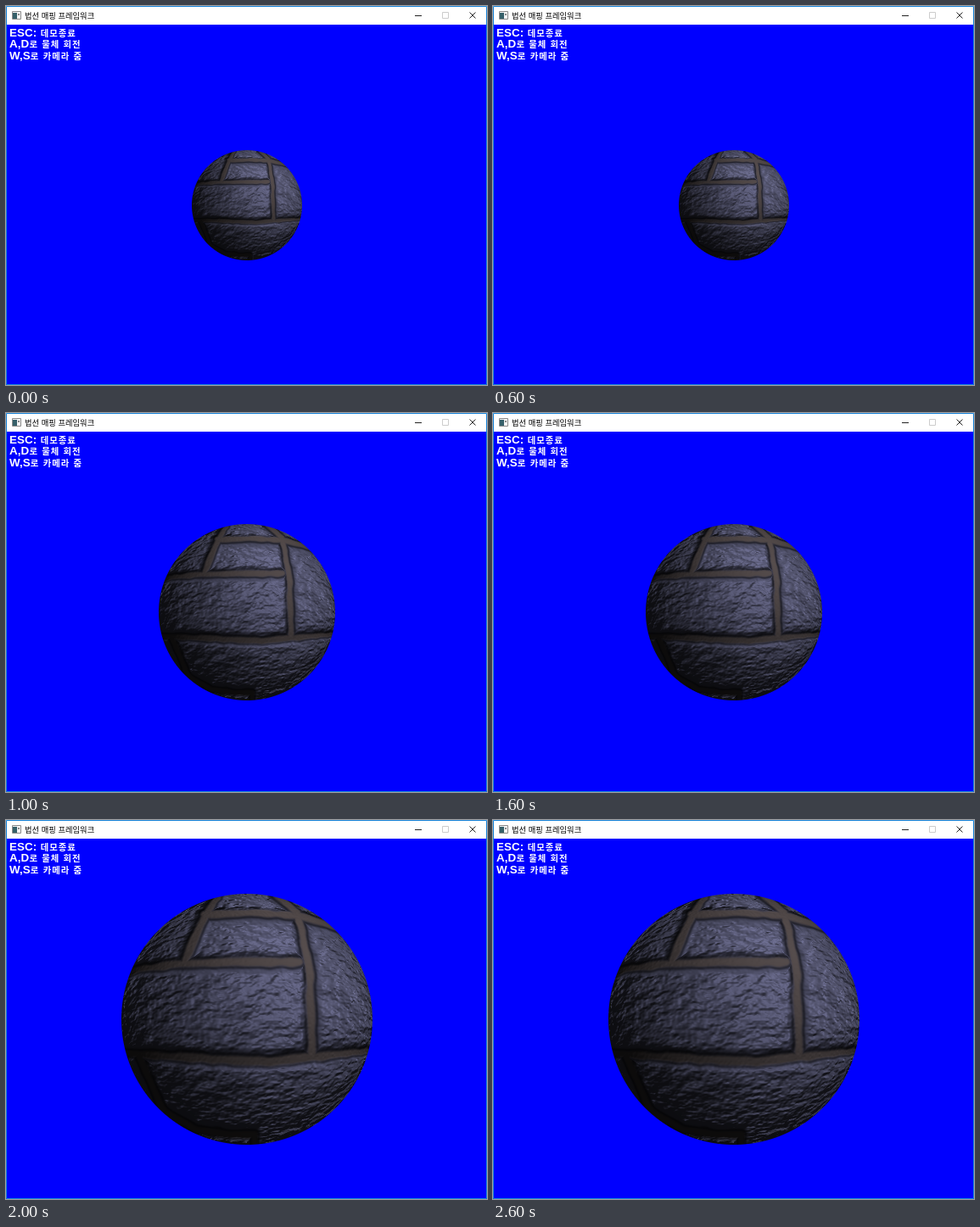
These frames come from a looping animation (567 px wide and 447 px high, 3 s). An HTML page with a canvas:

```html
<!DOCTYPE html>
<html lang="ko">
<meta charset="utf-8">
<style>
  html, body { margin: 0; overflow: hidden; background: #00f; }
  svg, canvas { position: absolute; left: 0; top: 0; }
  text { white-space: pre; }
  .title { font: 9.3px "Noto Sans CJK KR", "Noto Sans CJK", sans-serif; }
  .help { font: bold 10.4px "Noto Sans CJK KR", "Noto Sans CJK", sans-serif; fill: #fff; letter-spacing: .9px; word-spacing: .6px; }
  .help tspan { font: bold 13.4px "Liberation Sans", Arial, sans-serif; letter-spacing: .1px; }
</style>
<canvas id="stage" width="567" height="447"></canvas>
<svg width="567" height="447">
  <path d="M0 0H567V22H0Z" fill="#fff"/>
  <path d="M.5 .5H566.5V446.5H.5Z" fill="none" stroke="#1883d7"/>
  <path d="M7.5 6.5H17.5V15.5H7.5Z" fill="#f4f4f4" stroke="#8a8a8a"/>
  <path d="M8 8H13V15H8Z" fill="#36606a"/>
  <path d="M14 9H16V11H14Z" fill="#888"/>
  <text class="title" x="22" y="14.5">법선 매핑 프레임워크</text>
  <path d="M482 11.5H490M546.5 7.5L553.5 14.5M553.5 7.5L546.5 14.5" stroke="#222"/>
  <path d="M514.5 7.5H521.5V14.5H514.5Z" fill="none" stroke="#ccc"/>
  <g class="help">
    <text x="4" y="36"><tspan>ESC:</tspan> 데모종료</text>
    <text x="4" y="49"><tspan>A,D</tspan>로 물체 회전</text>
    <text x="4" y="63"><tspan>W,S</tspan>로 카메라 줌</text>
  </g>
</svg>
<script>
const CX = 284, CY = 234.5, FULL = 148;
// Sphere radius and how much more of the surface a distant camera sees
const views = [[65, .1], [104, .05], [148, 0]];

// Mortar lines between the stones, at the largest view
const mortar = [
  [138, 182, 158, 175, 205, 169, 260, 167, 346, 167],
  [318, 88, 343, 109, 351, 140, 358, 180, 360, 230, 361, 276],
  [136, 274, 200, 279, 260, 282, 310, 284, 364, 279, 432, 271],
  [252, 86, 234, 113, 220, 143, 209, 169],
  [233, 111, 290, 109, 343, 112, 374, 121, 402, 132],
  [157, 279, 171, 310, 184, 340, 206, 364],
  [184, 342, 225, 365, 265, 371, 293, 371, 293, 384]
];
const segments = mortar.flatMap(line => {
  const list = [];
  for (let i = 0; i + 3 < line.length; i += 2) list.push(line.slice(i, i + 4));
  return list;
});

const clamp = v => Math.min(1, Math.max(0, v));
const smooth = (a, b, v) => {
  const t = clamp((v - a) / (b - a));
  return t * t * (3 - 2 * t);
};
const hash = (x, y) => {
  const s = Math.sin(x * 127.1 + y * 311.7) * 43758.5453;
  return s - Math.floor(s);
};
function noise(x, y) {
  const ix = Math.floor(x), iy = Math.floor(y);
  const u = smooth(0, 1, x - ix), v = smooth(0, 1, y - iy);
  const top = hash(ix, iy) * (1 - u) + hash(ix + 1, iy) * u;
  const bottom = hash(ix, iy + 1) * (1 - u) + hash(ix + 1, iy + 1) * u;
  return top * (1 - v) + bottom * v - .5;
}

function mortarDistance(x, y) {
  let best = 1e9;
  for (const [ax, ay, bx, by] of segments) {
    const dx = bx - ax, dy = by - ay;
    const t = clamp(((x - ax) * dx + (y - ay) * dy) / (dx * dx + dy * dy));
    best = Math.min(best, (x - ax - t * dx) ** 2 + (y - ay - t * dy) ** 2);
  }
  return Math.sqrt(best);
}

function surface(px, py, spread) {
  const r2 = Math.min(1, px * px + py * py), r = Math.sqrt(r2) || 1e-6;
  const zoom = FULL * (1 + spread * (1 - r2));
  const x = px * zoom, y = py * zoom, bend = Math.asin(r) / r;
  const nx = x * bend, ny = y * bend + 3 * noise(nx / 30, 7);
  // Lines near the rim are foreshortened, so their gaps narrow there
  const gap = mortarDistance(x + CX, y + CY) * (1 + .5 * r2 * r2) + 2.5 * noise(nx / 14, ny / 14);
  const grain = 5 * noise(nx / 24, ny / 13) + 3.8 * noise(nx / 9, ny / 4.5) + 1.9 * noise(nx / 4, ny / 2.4);
  return { gap, height: smooth(3, 15, gap) * (8 + grain) + .5 * noise(nx / 3, ny / 3) };
}

function renderSphere([radius, spread]) {
  const size = 2 * radius + 4, canvas = document.createElement('canvas');
  canvas.width = canvas.height = size;
  const ctx = canvas.getContext('2d'), image = ctx.createImageData(size, size);
  const at = i => (i - (size - 1) / 2) / radius;
  const map = Array.from({ length: size * size }, (_, i) =>
    surface(at(i % size), at(Math.floor(i / size)), spread));
  const slope = radius / FULL * .4;
  for (let j = 1; j < size - 1; j++) for (let i = 1; i < size - 1; i++) {
    const x = at(i), y = at(j), r2 = x * x + y * y;
    const cover = clamp((1 - Math.sqrt(r2)) * radius + .5);
    if (!cover) continue;
    const k = j * size + i, { gap } = map[k];
    // The horizontal bump is mirrored: stones catch light on their left edge
    const nx = x + (map[k + 1].height - map[k - 1].height) * slope;
    const ny = y - (map[k + size].height - map[k - size].height) * slope;
    const nz = Math.sqrt(Math.max(0, 1 - r2)) + .08, len = Math.hypot(nx, ny, nz);
    const diffuse = Math.max(0, (.36 * nx - .5 * ny + .79 * nz) / len);
    const shine = Math.max(0, (.19 * nx - .26 * ny + .947 * nz) / len) ** 14;
    const stone = smooth(3, 8, gap);
    const side = clamp(.55 + .45 * x - .45 * y);
    const light = (.22 + .78 * diffuse) * (1 - .5 * Math.exp(-(((gap - 7) / 2.2) ** 2))) * (.7 + .4 * side);
    const glint = 32 * shine * stone * side;
    const tint = [[78, 80], [70, 81], [70, 106]];
    tint.forEach(([joint, rock], c) => {
      image.data[4 * k + c] = (joint + (rock - joint) * stone) * light + glint * [.9, .9, 1.2][c];
    });
    image.data[4 * k + 3] = 255 * cover;
  }
  ctx.putImageData(image, 0, 0);
  return canvas;
}

const stage = document.getElementById('stage').getContext('2d');
const spheres = views.map(renderSphere);
let start;
function draw(now) {
  start ??= now;
  const sphere = spheres[Math.floor((now - start) / 1000) % 3];
  stage.fillStyle = '#00f';
  stage.fillRect(0, 0, 567, 447);
  stage.drawImage(sphere, CX - sphere.width / 2, Math.round(CY - sphere.height / 2));
  requestAnimationFrame(draw);
}
requestAnimationFrame(draw);
</script>
</html>
```
